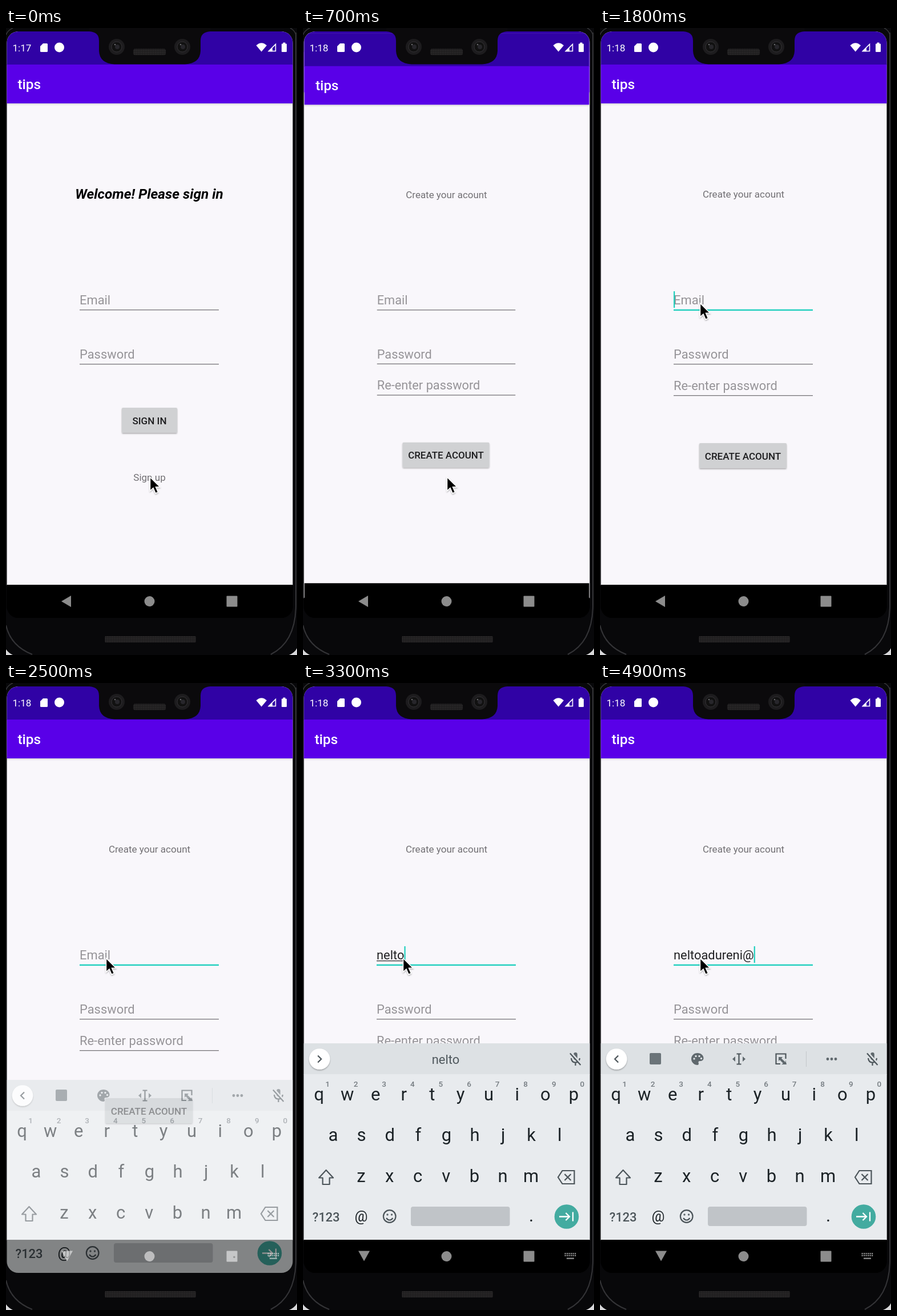
An HTML page for the animation above (5 s loop, 510x1098 px).

```html
<!DOCTYPE html>
<html lang="en">
<head>
<meta charset="utf-8">
<title>Sign up flow</title>
<style>
  html, body { margin: 0; width: 100%; height: 100%; overflow: hidden; background: #08080a; }
  svg { display: block; width: 100%; height: 100%; }
  text { font-family: Roboto, sans-serif; white-space: pre; }
  .mid { text-anchor: middle; }
  .field { font-size: 21.9px; }
  .hint { fill: #969498; }
  .small { font-size: 17.06px; fill: #727074; }
  .btn { font-size: 17.06px; font-weight: 500; fill: #1d1d1f; }
  .key { font-size: 31px; fill: #1b2226; }
  .num { font-size: 13.5px; font-weight: 500; fill: #747b80; }
  .ink { fill: #5f686d; }
  .line { fill: none; stroke: #4c555a; stroke-width: 2.2; }
</style>
</head>
<body>
<svg viewBox="0 0 510 1098" preserveAspectRatio="none">
  <defs>
    <clipPath id="screen"><rect x="1.5" y="6" width="501" height="1027" rx="20"/></clipPath>
    <linearGradient id="shade" x2="0" y2="1">
      <stop stop-color="#000" stop-opacity=".13"/><stop offset="1" stop-color="#000" stop-opacity="0"/>
    </linearGradient>
    <pattern id="mesh" width="3" height="3" patternUnits="userSpaceOnUse">
      <rect width="3" height="3" fill="#1c1b1c"/><rect width="1.6" height="1.6" fill="#343233"/>
    </pattern>
    <filter id="soft" x="-20%" y="-20%" width="140%" height="150%">
      <feDropShadow dx="0" dy="1.5" stdDeviation="1.2" flood-opacity=".32"/>
    </filter>
  </defs>

  <!-- phone body -->
  <rect width="510" height="1098" fill="#08080a"/>
  <path d="M0 1088Q4 1094 12 1098H0ZM510 1086Q506 1094 496 1098H510Z" fill="#d8d8da"/>
  <path d="M0 1046Q8 1082 46 1097M508 8V1010Q508 1075 464 1097" fill="none" stroke="#343437" stroke-width="2"/>
  <path d="M0 12Q3 4 12 0M498 0Q506 4 508 12" fill="none" stroke="#343437" stroke-width="1.5"/>
  <rect x="173" y="1065" width="160" height="11" rx="2" fill="url(#mesh)"/>

  <g clip-path="url(#screen)">
    <rect width="510" height="1040"/>
    <g id="signIn"></g>
    <g id="signUp"></g>
    <g id="board"></g>
    <g fill="#fff" fill-opacity=".55">
      <path id="back"/>
      <circle cx="251.5" cy="1004" r="9"/>
      <rect x="386.5" y="994.5" width="19" height="19" rx="1"/>
      <g id="ime"></g>
    </g>
    <!-- status bar -->
    <g fill="#fff">
      <text id="clock" x="11.5" y="40.5" font-size="17.06"></text>
      <path d="M65 27H71.5Q73 27 73 28.5V40.5Q73 42 71.5 42H61.5Q60 42 60 40.5V32Z"/>
      <circle cx="93.5" cy="34" r="8.5"/>
      <path d="M438.5 30.5Q447.7 22 457 30.5L447.7 41.5Z"/>
      <path d="M472.5 28.5V40.5H460.5Z" fill="none" stroke="#fff" stroke-width="1.6"/>
      <path d="M467 35V41.3H459Z"/>
      <path d="M485.5 27.5V25.5H489.5V27.5H491Q492 27.5 492 28.5V41Q492 42 491 42H484Q483 42 483 41V28.5Q483 27.5 484 27.5Z"/>
    </g>
  </g>

  <!-- notch -->
  <path d="M146 6Q163 7 163 22V40Q164 62 190 63.5H314Q340 62 341 40V22Q341 7 358 6V0H146Z" fill="#0b0a0c"/>
  <g id="lenses"></g>
  <rect x="223" y="36.500" width="57" height="11" rx="3" fill="url(#mesh)"/>

  <path id="pointer" d="M0 0V24L5.500 18.900 9.600 28.300 14 26.400 10 17.300H17.300Z" fill="#000" stroke="#fff" stroke-width="1.500" filter="url(#soft)"/>
</svg>

<script>
const $ = id => document.getElementById(id);
const text = (cls, x, y, s, more = '') => `<text class="${cls}" x="${x}" y="${y}" ${more}>${s}</text>`;
const rect = (x, y, w, h, fill, more = '') =>
  `<rect x="${x}" y="${y}" width="${w}" height="${h}" fill="${fill}" ${more}/>`;
const rule = y => rect(129, y, 244, 1.3, '#777579');
const button = (x, y, w, s) => rect(x, y, w, 44, '#d0d1d3', 'rx="2" filter="url(#soft)"') +
  text('btn mid', x + w / 2, y + 28.5, s);
const field = (y, s) => text('field hint', 129, y, s) + rule(y + 9);

const page = body => rect(1, 6, 502, 970, '#f9f7fb') + rect(1, 6, 502, 59, '#3002a5') +
  rect(1, 64, 502, 68, '#5900e8') + rect(1, 132, 502, 4, 'url(#shade)') + rect(1, 975, 502, 60, '#000') +
  text('', 20.5, 107, 'tips', 'font-size="24.4" font-weight="500" fill="#fff"') + body;

$('signIn').innerHTML = page(
  text('mid', 251, 299, 'Welcome! Please sign in', 'font-size="24.4" font-weight="700" font-style="italic"') +
  field(484, 'Email') + field(579, 'Password') +
  button(203, 665, 97, 'SIGN IN') + text('small mid', 251.5, 793, 'Sign up'));

$('signUp').innerHTML = page(
  text('small mid', 251.5, 297, 'Create your acount') +
  text('field', 129, 484, '', 'id="email"') +
  rect(129, 486, 0, 1.2, '#222', 'id="compose"') +
  rect(129, 493, 244, 1.3, '#777579', 'id="emailRule"') +
  rect(129, 461, 2.2, 29, '#1fcfbd', 'id="caret"') +
  field(579, 'Password') + field(634, 'Re-enter password') + button(174, 727, 153, 'CREATE ACOUNT'));

// keyboard
const row = (keys, x, y) => [...keys].map((k, i) => text('key mid', x + 49.6 * i, y, k)).join('');
const nums = [...'1234567890'].map((n, i) => text('num mid', 43 + 49.6 * i, 707, n)).join('');
const dots = [399, 406, 413].map(x => `<circle class="ink" cx="${x}" cy="658.500" r="2.400"/>`).join('');
$('board').innerHTML =
  rect(1, 631, 502, 55, '#dde1e4') + rect(1, 685, 502, 290, '#e8ebee') +
  `<circle cx="29" cy="658.500" r="18.300" fill="#fff" filter="url(#soft)"/>
  <path id="chevron" class="line"/>
  <g id="tools">
    ${rect(87, 648, 20, 20, '#6b7479', 'rx="2"')}
    <path class="ink" fill-rule="evenodd" d="M171 648C164 648 160 653 160 658.500S165 669 171 669Q174 668 172.500 665Q172 662 175 662H177Q181.500 661 181.500 657C181.500 652 177 648 171 648Z"/>
    <g fill="#dde1e4"><circle cx="165" cy="658" r="1.700"/><circle cx="168" cy="653.500" r="1.700"/><circle cx="174" cy="653.500" r="1.700"/><circle cx="177.500" cy="657.500" r="1.700"/></g>
    <path class="line" d="M239.500 649.500H247.500M239.500 667.500H247.500M243.500 649.500V667.500"/>
    <path class="ink" d="M237 654V663L232 658.500ZM250 654V663L255 658.500Z"/>
    <path class="line" d="M316 667H308.500V649.500H325.500V658" stroke="#5f686d"/>
    <path class="ink" d="M313 655H320L318 657.500 325 664V660L327 668H318L321 666 315 660 313 662Z"/>
    ${rect(361, 645, 1, 27, '#c3c8cb')}${dots}
  </g>` +
  text('field mid', 250, 666.5, '', 'id="suggest" fill="#4f585d"') +
  `<rect class="ink" x="474.300" y="647" width="6.500" height="13" rx="3.200"/>
  <path class="line" d="M470 657Q471 664.500 477.500 664.500T485 657M477.500 664V670" stroke-width="2"/>
  <path d="M469.500 648L487.500 668" stroke="#dde1e4" stroke-width="4.500"/>
  <path class="line" d="M468 648.500L486.500 669"/>` +
  nums + row('qwertyuiop', 28, 731) + row('asdfghjkl', 53, 802) + row('zxcvbnm', 102, 874) +
  `<path class="line" d="M40.500 853L53 866.500H46.500V878H34.500V866.500H28Z" stroke-linejoin="round"/>
  <path class="line" d="M454.500 854H475.500V877H454.500L447 865.500ZM458.500 860L469.500 871M469.500 860L458.500 871"/>
  <circle class="line" cx="151.700" cy="934" r="10.800"/>
  <path class="line" d="M146 937Q151.700 944 157.500 937"/>
  <circle class="ink" cx="148" cy="931" r="1.700"/><circle class="ink" cx="155.500" cy="931" r="1.700"/>` +
  text('mid', 40.5, 942.5, '?123', 'font-size="21.9" font-weight="500" fill="#4c555a"') +
  text('mid', 102, 943, '@', 'font-size="25.5" fill="#1b2226"') +
  rect(189, 917, 173.5, 34, '#c0c4c8', 'rx="4"') + text('key mid', 400, 943, '.') +
  `<circle cx="462" cy="934.500" r="21.300" fill="#43aba0"/>
  <path d="M449 934.500H467M460.500 928L467 934.500 460.500 941M473 926.500V942.500" fill="none" stroke="#fff" stroke-width="2.300"/>`;

$('ime').innerHTML = Array.from({ length: 15 }, (_, i) =>
  rect(458.5 + i % 6 * 3.5, 998 + 3.5 * (i / 6 | 0), 2.3, 2.3, '#fff')).slice(0, 12).join('') +
  rect(462, 1006.5, 13, 2.3, '#fff');

$('lenses').innerHTML = [194, 309].map(x =>
  `<circle cx="${x}" cy="33" r="14" fill="#1d1c1e"/><circle cx="${x}" cy="33" r="9" fill="#111" stroke="#343236"/>
   <circle cx="${x + 1}" cy="33" r="4" fill="#27262b"/><circle cx="${x - 3}" cy="29" r="1.300" fill="#69696c"/>`).join('');

// tables of [time, value...], interpolated
const track = (steps, t) => {
  const i = steps.findIndex(s => s[0] > t);
  if (i === 0) return steps[0].slice(1);
  if (i < 0) return steps[steps.length - 1].slice(1);
  const a = steps[i - 1], b = steps[i], k = (t - a[0]) / (b[0] - a[0]);
  return a.slice(1).map((v, n) => v + (b[n + 1] - v) * k);
};
const enter = [[300, .85, 0], [400, .88, .6], [500, .95, 1], [600, .984, 1], [700, .994, 1], [800, .998, 1], [900, 1, 1]];
const leave = [[300, 1], [400, 1.012], [500, 1.034], [600, 1.046], [700, 1.05]];
const slide = [[2400, 90, 0], [2500, 64, .56], [2600, 22, .95], [2700, 6, 1], [2800, 0, 1]];
const mouse = [[800, 252.5, 786.5], [900, 247, 766], [1000, 232, 705], [1100, 211, 630], [1200, 193, 565],
  [1300, 182, 514], [1400, 177, 490], [1500, 175.5, 482]];
const typed = 'neltoadureni@';
const strokes = [2900, 3000, 3100, 3200, 3300, 3500, 3600, 3800, 3900, 4100, 4200, 4300, 4900];

const set = (id, attrs) => { for (const k in attrs) $(id).setAttribute(k, attrs[k]); };
const show = (id, on) => set(id, { visibility: on ? 'visible' : 'hidden' });
const zoom = s => `translate(251.5 520) scale(${s}) translate(-251.5 -520)`;

function draw(t) {
  const [scale, alpha] = track(enter, t), [dy, fade] = track(slide, t), [mx, my] = track(mouse, t);
  set('signIn', { transform: zoom(track(leave, t)[0]) });
  show('signIn', t < 900);
  set('signUp', { transform: zoom(scale), opacity: alpha });
  set('board', { transform: `translate(0 ${dy})`, opacity: fade });
  set('pointer', { transform: `translate(${mx} ${my})` });
  $('clock').textContent = t < 300 ? '1:17' : '1:18';

  const count = strokes.filter(s => s <= t).length;
  const word = typed.slice(0, count), composing = count > 0 && count < typed.length;
  const email = $('email'), focus = t >= 1700;
  email.textContent = word || 'Email';
  set('email', { fill: word ? '#202022' : '#969498' });
  const w = word ? email.getComputedTextLength() : 0;
  set('compose', { width: composing ? w : 0 });
  set('emailRule', focus ? { y: 492.7, height: 2.4, fill: '#1fcfbd' } : { y: 493, height: 1.3, fill: '#777579' });
  set('caret', { x: 129 + w });
  show('caret', focus && (count > 0 || (t - 1700) % 1000 < 500));

  $('suggest').textContent = composing ? word : '';
  show('tools', !composing);
  set('chevron', { d: composing ? 'M26 652.5L32 658.5 26 664.5' : 'M32 652.5L26 658.5 32 664.5' });
  const up = t >= 2400;
  set('back', { d: up ? 'M97 994.5H117L107 1012.5Z' : 'M97 1004L114 994V1014Z' });
  show('ime', up);
}

const start = performance.now();
function tick() {
  const t = (performance.now() - start) % 5000;
  draw(Math.floor(t / 100) * 100);
  requestAnimationFrame(tick);
}
tick();
</script>
</body>
</html>
```
